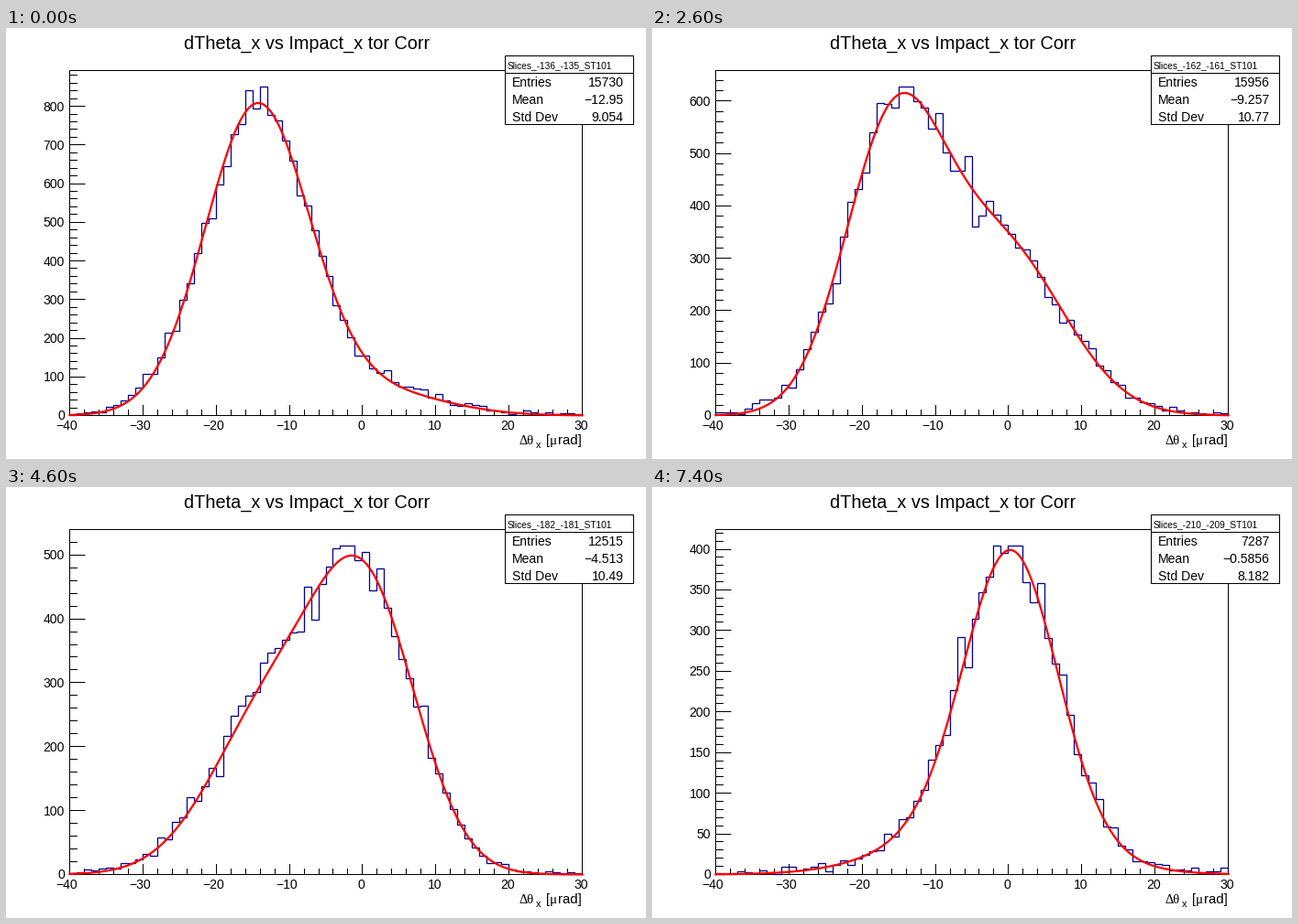
These frames come from a looping animation (698 by 471 pixels, 7600 ms). A matplotlib script:

```python
import numpy as np
import matplotlib.pyplot as plt
from matplotlib.animation import FuncAnimation
from matplotlib.collections import LineCollection
from matplotlib.patches import Rectangle

W, H, DPI = 698, 471, 64
FRAMES, STEP_MS = 38, 200
LEFT, RIGHT, TOP, BASE = 69.5, 628.5, 46.5, 423.5
X0, X1 = -40, 30
PT = 72 / DPI  # points per pixel

# Key slices; the ones between are interpolated.
KEYS = [0, 9, 16, 20, 27, 32, 37]
# left peak: height, centre, sigma; right peak: height, centre, sigma
PEAKS = np.array([
    [797, -14.4, 7.1, 60, 2.0, 9.0],
    [608, -15.8, 6.6, 224, -2.8, 9.8],
    [472, -15.7, 6.8, 388, 0.3, 7.75],
    [340, -16.5, 6.8, 506, 0.2, 7.65],
    [148, -6.5, 10.2, 276, 1.3, 6.0],
    [80, -4.5, 11.0, 350, 0.2, 6.2],
    [66, -3.0, 11.0, 336, 0.4, 6.3],
])
CREST = [850, 728, 552, 583, 423, 455, 404]  # tallest bin
ENTRIES = [15730, 15904, 15995, 15742, 8213, 8095, 7287]
MEANS = [-12.95, -11.02, -7.934, -5.86, -2.718, -1.5, -0.5856]
STDS = [9.054, 10.28, 11.13, 11.02, 9.777, 8.821, 8.182]

plt.rcParams["path.snap"] = False


def blend(i, values):
    return np.interp(i, KEYS, values)


def fit(u, i):
    a, c, s, b, d, t = [blend(i, col) for col in PEAKS.T]
    return (a * np.exp(-0.5 * ((u - c) / s) ** 2)
            + b * np.exp(-0.5 * ((u - d) / t) ** 2))


def counts(i, crest):
    """Fitted shape with counting noise, its tallest bin set to crest."""
    mean = fit(np.arange(X0, X1) + 0.5, i) + 2
    noise = np.random.default_rng(100 + i).normal(size=mean.size)
    n = np.clip(np.round(mean + noise * np.sqrt(mean)), 0, crest)
    n[n.argmax()] = crest
    return n


def px(u):
    return LEFT + (np.asarray(u) - X0) * (RIGHT - LEFT) / (X1 - X0)


def snap(v):
    return np.floor(v) + 0.5


def number(v):
    return f"{v:.4g}".replace("-", "\u2212")


fig = plt.figure(figsize=(W / DPI, H / DPI), dpi=DPI, facecolor="white")
ax = fig.add_axes([0, 0, 1, 1])
ax.set_xlim(0, W)
ax.set_ylim(H, 0)
ax.axis("off")


def label(x, y, s, size, ha="left", font="Liberation Sans", z=3):
    return ax.text(x, y, s, fontsize=size * PT, ha=ha, va="baseline",
                   family=font, color="black", zorder=z)


def box(x0, y0, x1, y1, fill, z):
    ax.add_patch(Rectangle((x0, y0), x1 - x0, y1 - y0, fc=fill, ec="black",
                           lw=PT, joinstyle="miter", zorder=z))


# Fixed parts
box(LEFT, TOP, RIGHT, BASE, "none", 1)
label(328.5, 23, "dTheta_x vs Impact_x tor Corr", 19.9, "center")
for u in range(X0, X1 + 1, 2):
    x = snap(px(u))
    ax.plot([x, x], [BASE, BASE - (11 if u % 10 == 0 else 6)],
            color="black", lw=PT, zorder=1)
    if u % 10 == 0:
        label(px(u) - (1.5 if u >= 0 else 3), 439, number(u), 14, "center")
label(560, 455, "\u0394\u03b8", 14.5, font="Liberation Serif")
label(577.5, 459, "x", 11)
label(588.5, 455, "[", 14)
label(593, 455, "\u03bc", 15, font="Liberation Serif")
label(627.5, 455, "rad]", 15, "right")

# Moving parts
ticks = LineCollection([], colors="black", linewidths=PT, zorder=1)
ax.add_collection(ticks)
y_labels = [label(64, 0, "", 14, "right") for _ in range(11)]
hist, = ax.plot([], [], color="#000099", lw=1.3 * PT, zorder=2,
                solid_joinstyle="miter")
curve, = ax.plot([], [], color="#ff0000", lw=2.3 * PT, zorder=2.5)

# Statistics box
box(544.5, 30.5, 684.5, 105.5, "white", 4)
ax.plot([544.5, 684.5], [49.5, 49.5], color="black", lw=PT, zorder=5)
name = label(547, 44, "", 10.1, z=5)
rows = []
for y, s in ((64, "Entries"), (83, "Mean"), (102, "Std Dev")):
    label(551.5, y, s, 14, z=5)
    rows.append(label(673.5, y, "", 14, "right", z=5))

EDGES = np.repeat(snap(px(np.arange(X0, X1 + 1))), 2)
GRID = np.linspace(X0, X1, 281)


def draw(i):
    crest = round(blend(i, CREST))
    top = 1.05 * crest
    scale = (BASE - TOP) / top

    def py(v):
        return BASE - np.asarray(v) * scale

    heights = snap(py(np.repeat(counts(i, crest), 2)))
    hist.set_data(EDGES, np.concatenate([[BASE], heights, [BASE]]))
    curve.set_data(px(GRID), py(fit(GRID, i)))

    major = 100 if top > 500 else 50
    segs = []
    for v in range(0, int(top) + 1, major // 5):
        y = snap(py(v))
        segs.append([(LEFT, y), (LEFT + (17 if v % major == 0 else 8.5), y)])
    ticks.set_segments(segs)
    for k, t in enumerate(y_labels):
        v = k * major
        t.set_text(str(v) if v <= top else "")
        t.set_y(py(v) + 5)

    lo = -136 - 2 * i
    name.set_text(f"Slices_{lo}_{lo + 1}_ST101")
    rows[0].set_text(f"{blend(i, ENTRIES):.0f}")
    rows[1].set_text(number(blend(i, MEANS)))
    rows[2].set_text(number(blend(i, STDS)))
    return []


anim = FuncAnimation(fig, draw, frames=FRAMES, interval=STEP_MS, repeat=True,
                     repeat_delay=0, blit=False)
plt.show()
```
